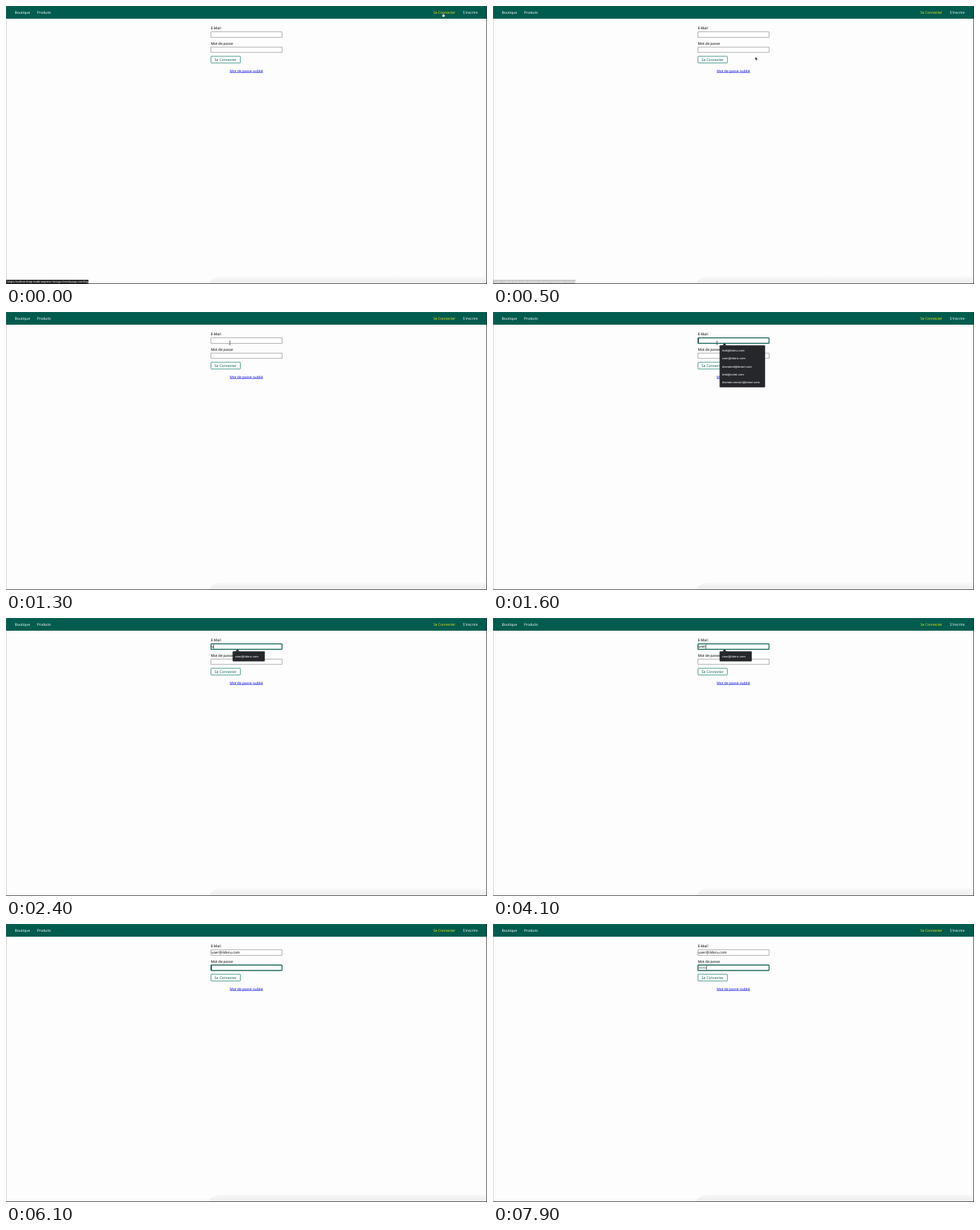
Write an HTML page that moves like this. It is 682 px wide and 394 px high and loops after 8000 ms.

```html
<!DOCTYPE html>
<html lang="fr">
<head>
<meta charset="utf-8">
<title>Connexion</title>
<style>
  html, body { margin: 0; width: 100%; height: 100%; overflow: hidden; background: #fdfdfd; }
  svg { display: block; width: 100vw; height: 100vh; }
  text { font: 5px "Noto Sans", "Open Sans", sans-serif; text-rendering: geometricPrecision; white-space: pre; }
  .nav { fill: #fff; }
  .active { fill: #f2e614; }
  .field { fill: #fff; stroke: #909090; stroke-width: .7; }
  .ring { fill: none; stroke: #0b5f52; stroke-width: 1.2; }
  .button { fill: #fff; stroke: #00745f; stroke-width: .7; }
  .teal { fill: #005c4e; }
  .link { fill: #0000e4; text-decoration: underline; }
  .panel { fill: #26272b; }
  .option { font: 500 4px Inter, "Noto Sans", sans-serif; fill: #f4f4f4; }
  .status { font-size: 4px; fill: #fff; }
</style>
</head>
<body>
<svg viewBox="0 0 682 394" preserveAspectRatio="none">
  <defs>
    <linearGradient id="shade" x2="0" y2="1">
      <stop offset="0" stop-color="#f8f8f8"/>
      <stop offset="1" stop-color="#ececec"/>
    </linearGradient>
  </defs>
  <rect width="682" height="394" fill="#fdfdfd"/>
  <path d="M287 394 Q291 385 304 383.500H682V394Z" fill="url(#shade)"/>

  <rect class="teal" width="682" height="18"/>
  <path d="M0 .25H682" stroke="#2f7569" stroke-width=".5"/>
  <text class="nav" x="12.500" y="11.100">Boutique</text>
  <text class="nav" x="44" y="11.100">Produits</text>
  <text class="nav active" x="606" y="11.100">Se Connecter</text>
  <text class="nav" x="647.700" y="11.100">S'inscrire</text>

  <text x="290.400" y="33.400">E-Mail</text>
  <rect class="field" x="290.700" y="36.700" width="100.600" height="7.600"/>
  <text x="290.400" y="55">Mot de passe</text>
  <rect class="field" x="290.700" y="58.200" width="100.600" height="7.600"/>
  <rect class="button" x="290.700" y="71.200" width="41.600" height="9.600" rx=".8"/>
  <text class="teal" x="295.800" y="77.900">Se Connecter</text>
  <text class="link" x="317.200" y="93.500">Mot de passe oublié</text>

  <text id="email" x="291.300" y="42.300"></text>
  <text id="password" x="291.300" y="63.800"></text>
  <rect id="ring" class="ring" x="290.600" width="100.800" height="7.800" rx=".9"/>
  <rect id="caret" width=".6" height="6"/>

  <g id="popup">
    <rect id="panel" class="panel" x="321.300" y="47.200" rx="1"/>
    <path class="panel" d="M325 47.500L328.200 44.300L331.400 47.500Z"/>
    <g id="options"></g>
  </g>

  <g id="status">
    <rect y="388" width="117" height="6" rx=".8" fill="#222"/>
    <text class="status" x="1.500" y="392.400">https://online-shop-node-express-mongo.herokuapp.com/login</text>
  </g>
  <path d="M0 393.600H682M681.600 0V394" stroke="#222" stroke-width=".8"/>
  <path d="M.2 0V394" stroke="#777" stroke-width=".4"/>

  <g id="hand" fill="#fff" stroke="#333" stroke-width=".35">
    <path d="M-.6 -1.500Q0 -2.200 .5 -1.500V0L2.200 .5V2.300L1.500 3.600H-.9L-2.100 1.200L-1.500 .7L-.6 1.400Z"/>
  </g>
  <path id="arrow" d="M0 0V4.700L1.100 3.700L1.900 5.400L2.700 5L1.900 3.400H3.400Z" stroke="#fff" stroke-width=".4"/>
  <path id="beam" d="M-1.100 -2.500Q0 -2.500 0 -2Q0 -2.500 1.100 -2.500M0 -2V2M-1.100 2.500Q0 2.500 0 2Q0 2.500 1.100 2.500" fill="none" stroke="#222" stroke-width=".6"/>
</svg>
<script>
const LOOP = 8000, TICK = 100, BLINK = 500;
const ADDRESS = "user@ildoru.com";
const SUGGESTIONS = ["test@ildoru.com", ADDRESS, "drumavel@tomul.com", "test@volmi.com", "drumav.monuri@tomul.com"];

// Key press times; each one adds a character.
const EMAIL_KEYS = [2300, 2800, 3000, 3100, 4200, 4500, 4600, 4700, 4800, 5000, 5100, 5500, 5600, 5700, 5900];
const PASSWORD_KEYS = [6800, 6900, 7000, 7500, 7700, 7900];
const EMAIL_FOCUS = 1600, PASSWORD_FOCUS = 6100;

// Pointer steps: time, shape, x, y
const POINTER = [
  [0, "hand", 620, 12], [100, "hand", 618, 12.5], [200, "arrow", 602, 20],
  [300, "arrow", 555, 37], [400, "arrow", 450, 60], [500, "arrow", 372, 72],
  [600, "arrow", 326, 74], [700, "arrow", 311, 68], [800, "beam", 314.5, 61],
  [900, "beam", 317, 53], [1000, "beam", 317.2, 50], [1100, "beam", 317.5, 47],
  [1200, "beam", 317.5, 45], [1300, "beam", 317.5, 43.8], [2300, "none", 0, 0]
];

const el = id => document.getElementById(id);
const show = (id, on) => el(id).style.display = on ? "" : "none";
const setAttrs = (id, attrs) => {
  for (const name in attrs) el(id).setAttribute(name, attrs[name]);
};
const pressed = (keys, t) => keys.filter(k => k <= t);

function fillOptions(list) {
  el("options").innerHTML = list.map((s, i) =>
    `<text class="option" x="325" y="${55.8 + i * 11.4}">${s}</text>`).join("");
}

function drawPointer(t) {
  const [, shape, x, y] = POINTER.filter(p => p[0] <= t).pop();
  for (const id of ["hand", "arrow", "beam"]) show(id, id === shape);
  if (shape !== "none") setAttrs(shape, { transform: `translate(${x} ${y})` });
}

function drawForm(t) {
  const onPassword = t >= PASSWORD_FOCUS;
  const emailKeys = pressed(EMAIL_KEYS, t), passwordKeys = pressed(PASSWORD_KEYS, t);
  el("email").textContent = ADDRESS.slice(0, emailKeys.length);
  el("password").textContent = "•".repeat(passwordKeys.length);

  const focused = t >= EMAIL_FOCUS;
  const top = onPassword ? 58.1 : 36.6;
  show("ring", focused);
  setAttrs("ring", { y: top });

  const keys = onPassword ? passwordKeys : emailKeys;
  const since = keys.length ? keys[keys.length - 1] : onPassword ? PASSWORD_FOCUS : EMAIL_FOCUS;
  const field = el(onPassword ? "password" : "email");
  show("caret", focused && Math.floor((t - since) / BLINK) % 2 === 0);
  const width = keys.length ? field.getComputedTextLength() : 0;
  setAttrs("caret", { x: 291.3 + width, y: top + .9 });

  const filtered = emailKeys.length > 0;
  show("popup", focused && t < 6000);
  setAttrs("panel", filtered ? { width: 45.6, height: 14.2 } : { width: 64.5, height: 59.6 });
  fillOptions(filtered ? [ADDRESS] : SUGGESTIONS);
}

let last = -1;
function render(now) {
  const t = Math.floor(now % LOOP / TICK) * TICK;
  if (t !== last) {
    last = t;
    drawPointer(t);
    drawForm(t);
    show("status", t < 900);
    el("status").style.opacity = t < 300 ? 1 : Math.max(.03, (600 - t) / 400);
  }
  requestAnimationFrame(render);
}
render(performance.now());
</script>
</body>
</html>
```
